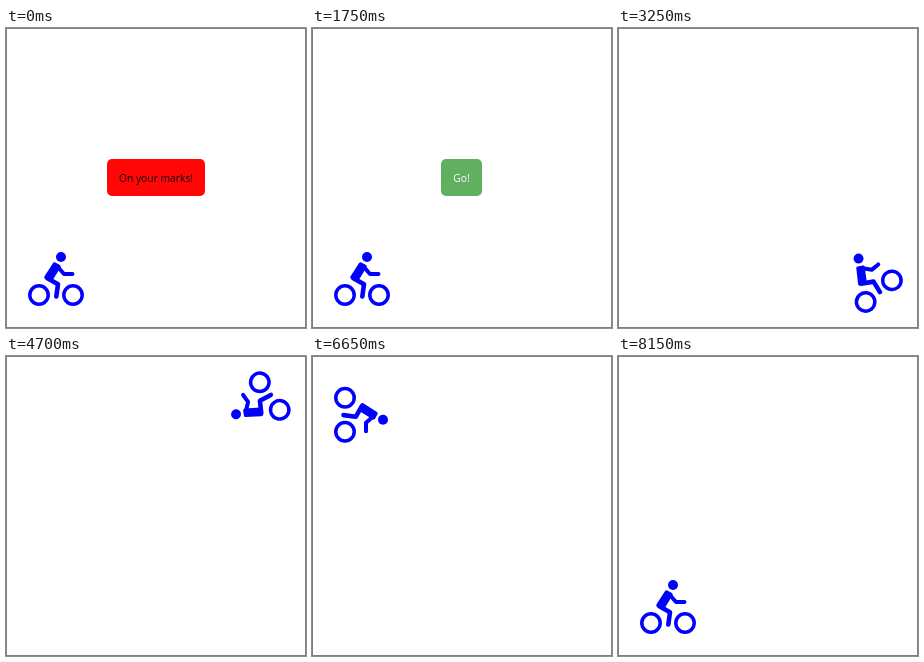
Animation of 300x300 px, one loop 10000 ms. Source, as an HTML page:

```html
<!DOCTYPE html>
<html lang="en">
<head>
<meta charset="utf-8">
<title>Bike lap</title>
<style>
  html, body { margin: 0; width: 100%; height: 100%; overflow: hidden; background: #fff; }
  svg { display: block; width: 100vw; height: 100vh; }
  text { font: 10.3px "Open Sans", "Noto Sans", sans-serif; text-anchor: middle; }
  #rider { fill: blue; stroke: blue; stroke-linecap: round; stroke-linejoin: round; }
  .line { fill: none; }
</style>
</head>
<body>
<svg viewBox="0 0 300 300">
  <rect x=".5" y=".5" width="299" height="299" fill="#fff" stroke="#808080"/>
  <g id="rider">
    <g class="line" stroke-width="3.5">
      <circle cx="-17" cy="17" r="9.2"/>
      <circle cx="17" cy="17" r="9.2"/>
    </g>
    <circle cx="5" cy="-21" r="5" stroke="none"/>
    <path d="M-1.5-14 3-11.5-5 1.5-10-.8Z" stroke-width="3.4"/>
    <path class="line" d="M1-12 8-4H16.5" stroke-width="4"/>
    <path class="line" d="M-9 0 2 6.3.3 18.5" stroke-width="4.6"/>
  </g>
  <g id="signs"></g>
</svg>
<script>
const LOOP = 10000, STEP = 50;

// start, end, label, box left, box width, fill, text colour
const signs = [
  [-25, 725, "On your marks!", 101, 98, "red", "black"],
  [725, 1475, "Get set!", 118, 63, "orange", "black"],
  [1475, 2200, "Go!", 129, 41, "green", "white"]
];

// time, x, y, angle
const route = [
  [2195, 50, 250, 0],
  [2940, 250, 250, 0],
  [3650, 250, 250, -90],
  [4402, 250, 50, -90],
  [5150, 250, 50, -180],
  [5900, 50, 50, -180],
  [6617, 50, 50, -270],
  [7366, 50, 250, -270],
  [8120, 50, 250, -360]
];

const rider = document.getElementById("rider");

function add(parent, tag, attrs) {
  const el = document.createElementNS("http://www.w3.org/2000/svg", tag);
  for (const key in attrs) el.setAttribute(key, attrs[key]);
  return parent.appendChild(el);
}

const boxes = signs.map(([, , label, x, width, fill, ink]) => {
  const g = add(document.getElementById("signs"), "g", {});
  add(g, "rect", { x, y: 131, width, height: 37, rx: 5, fill });
  add(g, "text", { x: x + width / 2, y: 154, fill: ink }).textContent = label;
  return g;
});

function pose(t) {
  const i = route.findIndex(p => p[0] > t);
  if (i === 0) return route[0].slice(1);
  if (i < 0) return route[route.length - 1].slice(1);
  const a = route[i - 1], b = route[i];
  const k = (t - a[0]) / (b[0] - a[0]);
  return [1, 2, 3].map(n => a[n] + (b[n] - a[n]) * k);
}

function draw(t) {
  signs.forEach(([start, end], i) => {
    const on = t >= start && t < end;
    boxes[i].setAttribute("opacity", on ? 1 - (t - start) / (end - start) : 0);
  });
  const [x, y, angle] = pose(t);
  rider.setAttribute("transform", `translate(${x} ${y}) rotate(${angle})`);
}

const begin = performance.now();
function tick() {
  const t = (performance.now() - begin) % LOOP;
  draw(Math.floor(t / STEP) * STEP);
  requestAnimationFrame(tick);
}
tick();
</script>
</body>
</html>
```
